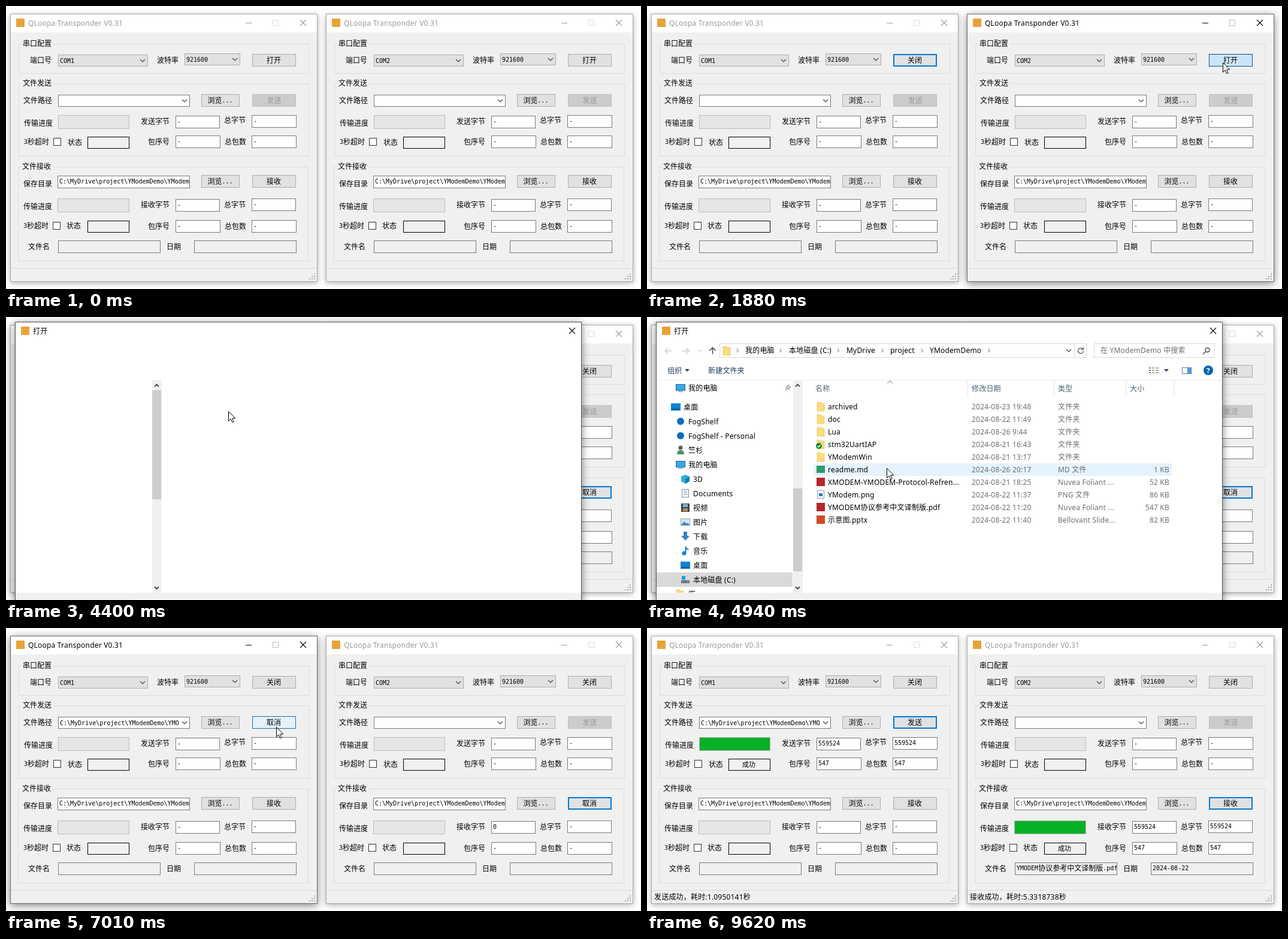
An HTML page that plays this animation: 1060 by 472 pixels, repeating every 9.71 s.

```html
<!DOCTYPE html>
<html lang="zh-CN">
<head>
<meta charset="utf-8">
<title>Serial file transfer</title>
<style>
html, body { margin: 0; width: 100%; height: 100%; overflow: hidden; background: #fff; }
svg { display: block; }
text { white-space: pre; }
.ui { font: 12px "Noto Sans", "Noto Sans CJK SC", "Noto Sans CJK", sans-serif; letter-spacing: .2px; }
.form { font: 12px "Noto Sans CJK SC", "Noto Sans CJK", sans-serif; }
.mono { font: 10px "DejaVu Sans Mono", "Liberation Mono", monospace; }
.shade { filter: drop-shadow(0 2px 5px rgba(0,0,0,.32)); }
.shade.on { filter: drop-shadow(0 3px 7px rgba(0,0,0,.5)); }
</style>
</head>
<body>
<svg id="stage" width="1060" height="472" viewBox="0 0 1060 472">
  <g id="scene"></g>
  <path id="cursor" d="M.5 .5V16.5L4.2 13L6.8 18.8L9.2 17.8L6.7 12H11.8Z" fill="#fff" stroke="#000"/>
</svg>
<script>
const LOOP = 9710, STEP = 90, FIRST = 80;
const BLUE = '#0078d7';
const FOLDER = 'C:\\MyDrive\\project\\YModemDemo\\YModem';
const SEND_PATH = 'C:\\MyDrive\\project\\YModemDemo\\YMO';
const FILE = 'YMODEM协议参考中文译制版.pdf';
const BYTES = 559524, PACKETS = 547;

// time, x, y of the pointer
const TRACK = [
  [80, 753, 249], [620, 447, 92], [890, 447, 92], [1610, 961, 94], [1970, 961, 94],
  [2330, 986, 292], [2510, 986, 292], [2600, 983, 292], [2960, 983, 292],
  [3320, 539, 192], [3860, 371, 157], [4580, 371, 157], [5210, 418, 314],
  [5480, 399, 314], [6020, 399, 314], [6740, 451, 165], [8540, 451, 165], [8900, 773, 421]
];

function pointer(t) {
  if (t < FIRST || t >= 8990) return null;
  const i = TRACK.findIndex(k => k[0] > t);
  if (i < 0) return TRACK[TRACK.length - 1].slice(1);
  const [t0, x0, y0] = TRACK[i - 1], [t1, x1, y1] = TRACK[i];
  const u = (t - t0) / (t1 - t0), e = u * u * (3 - 2 * u);
  return [Math.round(x0 + (x1 - x0) * e), Math.round(y0 + (y1 - y0) * e)];
}

// ---- drawing helpers ----
const fill = (x, y, w, h, c) => `<rect x="${x}" y="${y}" width="${w}" height="${h}" fill="${c}"/>`;
const box = (x, y, w, h, c, line, lw = 1) =>
  `<rect x="${x + lw / 2}" y="${y + lw / 2}" width="${w - lw}" height="${h - lw}" fill="${c}" stroke="${line}" stroke-width="${lw}"/>`;
const path = (d, c = '#444', w = 1, f = 'none') => `<path d="${d}" stroke="${c}" stroke-width="${w}" fill="${f}"/>`;
const disc = (x, y, r, c) => `<circle cx="${x}" cy="${y}" r="${r}" fill="${c}"/>`;
const ui = (x, cy, s, c = '#000', anchor = 'start') =>
  `<text class="ui" x="${x}" y="${cy + 4.5}" fill="${c}" text-anchor="${anchor}">${s}</text>`;
const form = (x, cy, s, c = '#000', anchor = 'start') =>
  `<text class="form" x="${x}" y="${cy + 4.5}" fill="${c}" text-anchor="${anchor}">` +
  s.replace(/[\x20-\x7e]+/g, m => `<tspan class="mono" dy="-.6">${m}</tspan><tspan dy=".6">\u200b</tspan>`) + '</text>';
const chevron = (x, y, c = '#444', r = 4) => path(`M${x - r} ${y - r / 2}l${r} ${r}l${r} ${-r}`, c, 1.2);
const cross = (x, y, c) => path(`M${x - 5} ${y - 5}l10 10m0 -10l-10 10`, c, 1.1);
const field = (x, y, w, s, c = '#fff') => box(x, y, w, 21, c, '#7a7a7a') +
  `<svg x="${x + 1}" y="${y + 1}" width="${w - 2}" height="19">${form(2, 8.5, s)}</svg>`;
const bar = (x, y, w, p) => box(x, y, w, 23, '#e6e6e6', '#bcbcbc') +
  (p > 0 ? fill(x + 1, y + 1, (w - 2) * p, 21, '#06b025') : '');
const combo = (x, y, w, s, c, line) => box(x, y, w, 20, c, line) + form(x + 3, y + 10, s) + chevron(x + w - 9, y + 10);

const BUTTONS = { open: [411, 80, 73], browse: [326, 147, 64], send: [411, 147, 73], browse2: [326, 282, 64], recv: [411, 282, 73] };

function button(id, s, win) {
  const [x, y, w] = BUTTONS[id];
  if (id === 'send' && !win.canSend)
    return box(x, y, w, 21, '#ccc', '#bfbfbf') + form(x + w / 2, y + 10, s, '#989898', 'middle');
  const [px, py] = win.pointer || [-99, -99];
  const over = px >= x && px < x + w && py >= y && py < y + 21;
  const face = win.pressed === id ? ['#cce4f7', '#005499']
    : over ? ['#e5f1fb', '#1f6fae']
    : win.focus === id ? ['#e1e1e1', BLUE, 2] : ['#e1e1e1', '#adadad'];
  return box(x, y, w, 21, ...face) + form(x + w / 2 - .5, y + 10, s, '#000', 'middle');
}

const LABELS = [
  [40, 90, '端口号'], [252, 90, '波特率'], [29, 157, '文件路径'], [30, 195, '传输进度'],
  [225, 192, '发送字节'], [364, 190, '总字节'], [30, 226, '3秒超时'], [103, 227, '状态'],
  [237, 226, '包序号'], [365, 226, '总包数'], [29, 296, '保存目录'], [29, 334, '传输进度'],
  [225, 331, '接收字节'], [364, 331, '总字节'], [29, 366, '3秒超时'], [101, 366, '状态'],
  [237, 367, '包序号'], [365, 367, '总包数'], [37, 401, '文件名'], [268, 401, '日期']
];
const GROUPS = [[21, 63, 50, 28, '串口配置'], [21, 129, 122, 28, '文件发送'], [20, 268, 158, 27, '文件接收']];

function grip() {
  let s = '';
  for (let r = 0; r < 3; r++) for (let c = 2 - r; c < 3; c++) s += fill(506 + c * 4, 446 + r * 4, 2, 2, '#a8a8a8');
  return s;
}

function figures(p, first) {
  if (p == null) return [first, '-', '-', '-'];
  return [Math.round(BYTES * p), BYTES, Math.round(PACKETS * p), PACKETS].map(String);
}

function windowView(win, dx) {
  const ink = win.active ? '#000' : '#999';
  const tx = figures(win.sent, '-'), rx = figures(win.got, win.waiting ? '0' : '-');
  const status = (y, p) => box(136, y, 70, 20, '#f0f0f0', '#000') +
    (p === 1 ? `<text class="form" x="170" y="${y + 14}" style="font-size:11px" text-anchor="middle">成功</text>` : '');
  return `<g transform="translate(${dx})">
    <rect class="shade ${win.active ? 'on' : ''}" x="7" y="13" width="513" height="447" fill="#f0f0f0"/>` +
    box(7, 13, 513, 447, '#f0f0f0', win.active ? '#6a6a6a' : '#aaa') + fill(8, 14, 511, 30, '#fff') +
    fill(17, 21, 14, 14, '#e8a33a') + ui(37, 28, 'QLoopa Transponder V0.31', ink) +
    path('M400 28.5h10', ink) + box(445, 23, 10, 10, 'none', win.active ? '#bbb' : '#ddd') + cross(496, 28, ink) +
    GROUPS.map(([x, y, h, lx, s]) => box(x, y, 485, h, 'none', '#dcdcdc') + fill(lx - 2, y - 4, 52, 9, '#f0f0f0') + form(lx, y - 1, s)).join('') +
    LABELS.map(l => form(...l)).join('') +
    combo(87, 81, 150, win.port, '#e1e1e1', '#adadad') + combo(298, 79, 93, '921600', '#e1e1e1', '#adadad') +
    combo(87, 148, 220, win.path, '#fff', '#7a7a7a') +
    button('open', win.opened ? '关闭' : '打开', win) + button('browse', '浏览...', win) +
    button('send', win.sending ? '取消' : '发送', win) + button('browse2', '浏览...', win) +
    button('recv', win.waiting && win.got !== 1 ? '取消' : '接收', win) +
    bar(87, 182, 119, win.sent) + bar(86, 321, 120, win.got) +
    field(283, 183, 74, tx[0]) + field(410, 182, 75, tx[1]) + field(283, 216, 75, tx[2]) + field(410, 216, 75, tx[3]) +
    field(86, 283, 221, FOLDER) +
    field(283, 322, 74, rx[0]) + field(410, 321, 74, rx[1]) + field(283, 357, 75, rx[2]) + field(410, 357, 75, rx[3]) +
    status(218, win.sent) + status(358, win.got) +
    box(79, 220, 13, 13, '#fff', '#333') + box(78, 360, 13, 13, '#fff', '#333') +
    field(87, 391, 171, win.got != null ? FILE : '', '#f0f0f0') +
    field(314, 391, 171, win.got != null ? '2024-08-22' : '', '#f0f0f0') +
    fill(8, 437, 511, 1, '#d7d7d7') + ui(12, 448, win.note) + grip() + '</g>';
}

// ---- file dialog ----
const ICONS = {
  folder: (x, y) => path(`M${x + 1} ${y - 7}h6l1 2h5v13h-12z`, '#e8c25a', .7, '#fbdb7d'),
  checked: (x, y) => ICONS.folder(x, y) + disc(x + 4, y + 3, 5, '#17862b') + path(`M${x + 1.5} ${y + 3}l2 2l3.5 -4`, '#fff', 1.4),
  screen: (x, y) => box(x, y - 6, 16, 11, '#35a8ea', '#20658f') + fill(x + 4, y + 6, 8, 1, '#678'),
  desk: (x, y) => fill(x, y - 6, 16, 12, '#0a84d0') + fill(x + 1, y + 3, 14, 2, '#065a9e'),
  cloud: (x, y) => disc(x + 8, y, 6, '#0f6cbd'),
  person: (x, y) => disc(x + 8, y - 4, 3.5, '#6b5a4a') + path(`M${x + 2} ${y + 7}q0 -7 6 -7t6 7z`, 'none', 0, '#4d8d6e'),
  cube: (x, y) => path(`M${x + 8} ${y - 7}l7 3v8l-7 4l-7 -4v-8z`, 'none', 0, '#29b1d6') + path(`M${x + 8} ${y}l7 -4v8l-7 4z`, 'none', 0, '#107fa8'),
  doc: (x, y) => box(x + 2, y - 7, 12, 14, '#fff', '#789') + path(`M${x + 5} ${y - 3.5}h6m-6 3h6m-6 3h6`, '#4b9cd3'),
  film: (x, y) => fill(x + 1, y - 7, 14, 14, '#444') + fill(x + 4, y - 6, 8, 5, '#78b5e8') + fill(x + 4, y + 1, 8, 5, '#b48a5a'),
  image: (x, y) => box(x, y - 6, 16, 12, '#cdeafb', '#8aa') + path(`M${x + 1} ${y + 5}l5 -6l4 4l2 -2l3 4z`, 'none', 0, '#3f83b8'),
  down: (x, y) => path(`M${x + 5} ${y - 8}h6v7h4l-7 8l-7 -8h4z`, 'none', 0, '#3a7fd0'),
  note: (x, y) => disc(x + 6, y + 4, 3.5, '#1683d8') + path(`M${x + 8.5} ${y + 4}v-11q1 4 5 5`, '#1683d8', 2),
  disk: (x, y) => fill(x + 1, y + 1, 14, 5, '#6d7780') + fill(x + 2, y - 6, 6, 6, '#1a9be8') + fill(x + 11, y + 3, 2, 1, '#6f6'),
  md: (x, y) => fill(x, y - 6, 14, 12, '#2d9c6c'),
  pdf: (x, y) => fill(x, y - 7, 14, 14, '#b8262b'),
  png: (x, y) => box(x + 1, y - 7, 12, 14, '#fff', '#89a') + fill(x + 4, y - 2, 6, 5, '#2f78c4'),
  ppt: (x, y) => fill(x, y - 7, 14, 14, '#d04a26')
};

const NAV = [
  [48, 118, 'screen', '我的电脑'], [40, 150, 'desk', '桌面'], [48, 174, 'cloud', 'FogShelf'],
  [48, 198, 'cloud', 'FogShelf - Personal'], [48, 222, 'person', '竺杉'], [48, 246, 'screen', '我的电脑'],
  [56, 270, 'cube', '3D'], [56, 294, 'doc', 'Documents'], [56, 318, 'film', '视频'], [56, 342, 'image', '图片'],
  [56, 366, 'down', '下载'], [56, 390, 'note', '音乐'], [56, 414, 'desk', '桌面'],
  [56, 438, 'disk', '本地磁盘 (C:)'], [48, 462, 'folder', '库']
];
const FILES = [
  ['folder', 'archived', '08-23 19:48', '文件夹'], ['folder', 'doc', '08-22 11:49', '文件夹'],
  ['folder', 'Lua', '08-26 9:44', '文件夹'], ['checked', 'stm32UartIAP', '08-21 16:43', '文件夹'],
  ['folder', 'YModemWin', '08-21 13:17', '文件夹'], ['md', 'readme.md', '08-26 20:17', 'MD 文件', '1 KB'],
  ['pdf', 'XMODEM-YMODEM-Protocol-Refren...', '08-21 18:25', 'Nuvea Foliant ...', '52 KB'],
  ['png', 'YModem.png', '08-22 11:37', 'PNG 文件', '86 KB'],
  ['pdf', FILE, '08-22 11:20', 'Nuvea Foliant ...', '547 KB'],
  ['ppt', '示意图.pptx', '08-22 11:40', 'Bellovant Slide...', '82 KB']
];
const CRUMBS = [[164, '我的电脑'], [237, '本地磁盘 (C:)'], [333, 'MyDrive'], [406, 'project'], [472, 'YModemDemo']];
const HEADS = [[281, '名称'], [542, '修改日期'], [686, '类型'], [806, '大小']];

function toolbar() {
  const tri = x => path(`M${x - 4} 87h8l-4 4z`, 'none', 0, '#1e395b');
  const views = [0, 1, 2].map(i => fill(838, 84 + i * 4, 3, 2, '#777') + fill(843, 84 + i * 4, 4, 2, '#aaa') + fill(849, 84 + i * 4, 5, 2, '#aaa')).join('');
  return path('M41 56.5H30m5 -5l-5 5l5 5M59 56.5h11m-5 -5l5 5l-5 5', '#ccc', 1.3) + chevron(88, 56, '#ccc', 2) +
    path('M109.5 62V51m-5 5l5 -5l5 5', '#444', 1.5) + box(121, 44, 613, 24, '#fff', '#d9d9d9') + ICONS.folder(126, 56) +
    [151, 223, 319, 393, 459, 571].map(x => path(`M${x - 1.5} 53l3 3l-3 3`, '#555')).join('') +
    CRUMBS.map(([x, s]) => ui(x, 55.5, s)).join('') + chevron(704, 56) + fill(713, 45, 1, 22, '#d9d9d9') +
    path('M727.5 53.5a4.5 4.5 0 1 0 1 3M728.5 50.5v3.5h-4', '#555', 1.3) +
    box(746, 44, 202, 24, '#fff', '#d9d9d9') + ui(757, 55.5, '在 YModemDemo 中搜索', '#6d6d6d') +
    path('M933 57l-5 5M932 55a3.5 3.5 0 1 1 7 0a3.5 3.5 0 1 1 -7 0', '#444', 1.4) +
    ui(34, 89, '组织', '#1e395b') + tri(67) + ui(102, 89, '新建文件夹', '#1e395b') + views + tri(867) +
    box(893, 84, 16, 11, '#fff', '#5a7ca0') + fill(902, 85, 6, 9, '#4f9de0') +
    disc(937, 89, 8, '#0063b1') + `<text class="ui" x="937" y="93.5" fill="#fff" font-weight="700" text-anchor="middle" style="font-weight:700">?</text>`;
}

function listing(row, chosen) {
  let s = fill(16, 105, 944, 1, '#ebebeb') + HEADS.map(([x, h]) => ui(x, 119, h, '#4c607a')).join('') +
    [535, 679, 799, 879].map(x => fill(x, 106, 1, 27, '#e5e5e5')).join('') + path('M401.5 110.5l4 -4l4 4', '#666');
  FILES.forEach(([icon, name, date, type, size], i) => {
    const y = 149 + i * 21;
    if (i === row) s += chosen ? box(278, y + -10, 598, 21, '#cce8ff', '#99d1ff') : fill(278, y - 10, 598, 21, '#e5f3ff');
    s += ICONS[icon](283, y) + ui(302, y, name) + ui(542, y, '2024-' + date, '#6d6d6d') + ui(686, y, type, '#6d6d6d');
    if (size) s += ui(872, y, size, '#6d6d6d', 'end');
  });
  const nav = NAV.map(([x, y, icon, name]) => ICONS[icon](x, y - 106) + ui(x + 21, y - 106, name)).join('');
  return s + `<svg x="0" y="106" width="243" height="354">${fill(16, 320, 227, 24, '#d9d9d9')}${nav}</svg>` +
    path('M231 122l3 -3m-2 -3l5 5m-4 -4l3 -3l3 3l-3 3', '#8795a5', 1.5);
}

function dialog(t, at) {
  const loaded = t >= 4580, row = loaded && at && at[0] > 278 ? Math.floor((at[1] - 139) / 21) : -1;
  const opacity = t < 4400 ? .6 : 1;
  const thumb = loaded ? [286, 138] : [122, 182];
  return `<g opacity="${opacity}"><rect class="shade on" x="15" y="8" width="946" height="480" fill="#fff"/>` +
    box(15, 8, 946, 480, t >= 5660 ? '#fcfcfc' : '#fff', '#555') + fill(25, 16, 14, 14, '#e8a33a') + ui(45, 23, '打开') + cross(945, 23, '#000') +
    fill(16, 460, 944, 12, '#f0f0f0') + fill(208, 471, 736, 1, t >= 5660 ? '#7a7a7a' : '#fff') +
    (t >= 4490 ? toolbar() : '') + (loaded ? listing(row, t >= 5660) : '') +
    fill(244, 105, 16, 355, '#f0f0f0') + fill(244, thumb[0], 15, thumb[1], '#cdcdcd') +
    path('M248 116l3.5 -3.5l3.5 3.5M248 450l3.5 3.5l3.5 -3.5', '#444', 1.8) + '</g>';
}

// ---- timeline ----
const within = (t, a, b) => t >= a && t < b;

function sceneAt(t) {
  const at = pointer(t), modal = within(t, 4310, 5840), done = t >= 8090;
  const p = t < 7460 ? null : Math.min(1, (t - 7460 + 20) / 650);
  const left = {
    port: 'COM1', active: within(t, 800, 1880) || within(t, 3950, 4310) || within(t, 5840, 9620),
    opened: t >= 890, path: t >= 5840 ? SEND_PATH : '', canSend: t >= 5840, sending: t >= 7010 && !done, sent: p, got: null,
    focus: t >= 7010 ? 'send' : t >= 3950 ? 'browse' : t >= 800 ? 'open' : '',
    pressed: within(t, 800, 890) ? 'open' : within(t, 3950, 4040) ? 'browse' : '',
    pointer: modal ? null : at, note: done ? '发送成功，耗时:1.0950141秒' : ''
  };
  const right = {
    port: 'COM2', active: within(t, 1880, 3950), opened: t >= 1970, path: '', canSend: false, sent: null,
    waiting: t >= 3050, got: p, focus: t >= 2960 ? 'recv' : t >= 1880 ? 'open' : '',
    pressed: within(t, 1880, 1970) ? 'open' : within(t, 2960, 3050) ? 'recv' : '',
    pointer: at && !modal ? [at[0] - 527, at[1]] : null, note: done ? '接收成功，耗时:5.3318738秒' : ''
  };
  const views = [windowView(left, 0), windowView(right, 527)];
  if (left.active) views.reverse();
  return views.join('') + (modal ? dialog(t, at) : '');
}

const scene = document.getElementById('scene'), cursor = document.getElementById('cursor');
let shown = -1;

function tick() {
  const now = performance.now() % LOOP;
  const t = now < FIRST ? 0 : FIRST + Math.floor((now - FIRST) / STEP) * STEP;
  if (t !== shown) {
    shown = t;
    scene.innerHTML = sceneAt(t);
    const at = pointer(t);
    cursor.setAttribute('visibility', at ? 'visible' : 'hidden');
    if (at) cursor.setAttribute('transform', `translate(${at})`);
  }
  requestAnimationFrame(tick);
}
tick();
</script>
</body>
</html>
```
